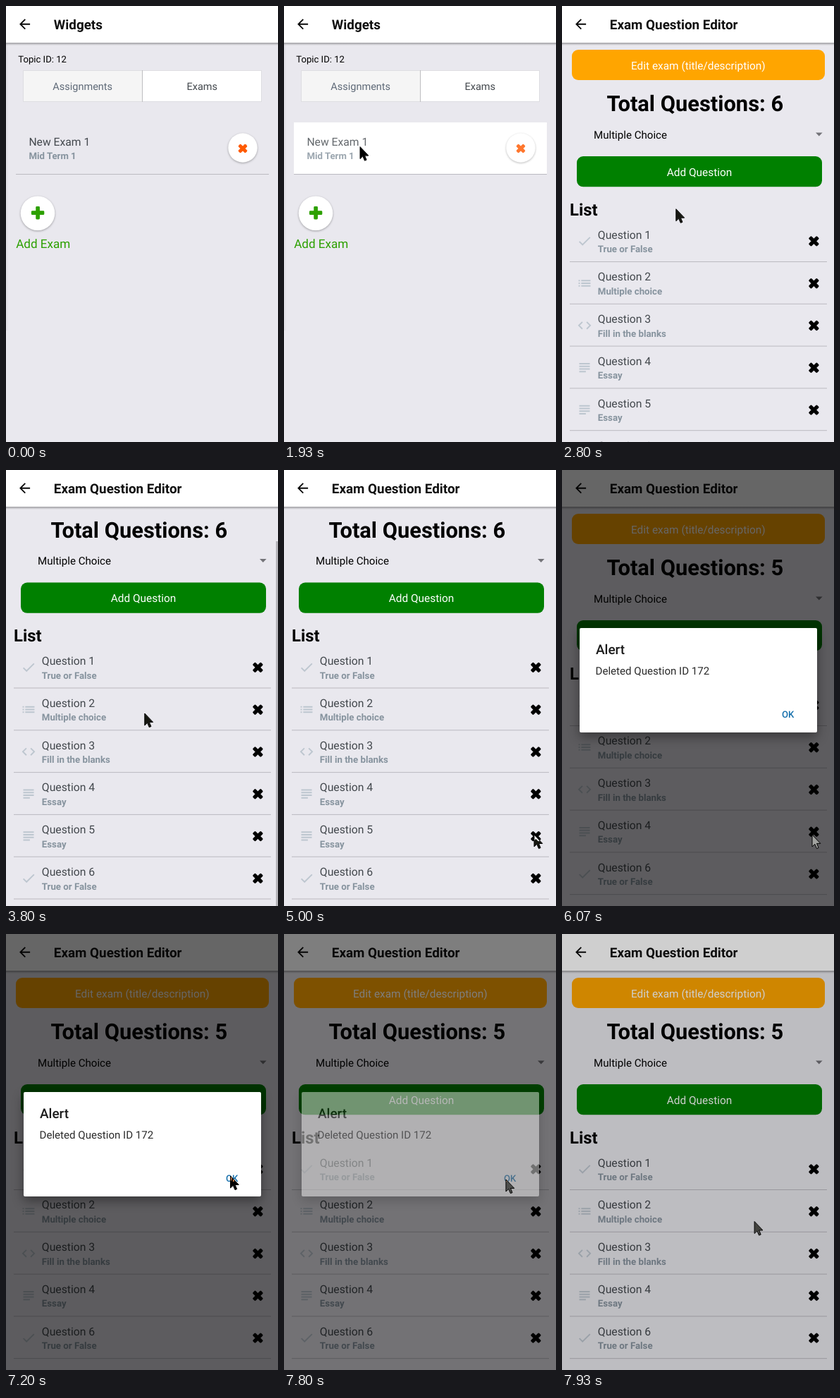
An HTML page for the animation above (8000 ms loop, 386 px wide and 618 px high).

```html
<!DOCTYPE html>
<html lang="en">
<head>
<meta charset="utf-8">
<title>Exam editor</title>
<style>
  html, body { margin: 0; width: 100%; height: 100%; overflow: hidden; background: #e9e8ee; }
  svg { display: block; isolation: isolate; }
  text { font-family: Roboto, "Noto Sans", sans-serif; text-rendering: geometricPrecision; white-space: pre; }
  .b { font-weight: 700; }
  .m { font-weight: 500; }
  .mid { text-anchor: middle; }
  .disc { fill: #fff; filter: drop-shadow(0 1px 1.5px rgba(0, 0, 0, .32)); }
  #alert { filter: drop-shadow(0 6px 8px rgba(0, 0, 0, .4)); }
  #arrowFill { mix-blend-mode: difference; }
</style>
</head>
<body>
<svg id="stage" width="386" height="618" viewBox="0 0 386 618"></svg>
<script>
const LOOP = 8000, FPS = 15;
const BG = '#e9e8ee', INK = '#43484d', SOFT = '#86939e', GREEN = '#2ca000', LINE = '#bbbac0';
const PITCH = 59.8, SCROLL = 53.5;

// ---------- drawing helpers ----------
const text = (x, y, size, fill, str, cls = '') =>
  `<text x="${x}" y="${y}" font-size="${size}" fill="${fill}" class="${cls}">${str}</text>`;
const rect = (x, y, w, h, fill, extra = '') =>
  `<rect x="${x}" y="${y}" width="${w}" height="${h}" fill="${fill}" ${extra}/>`;
const icon = (cx, cy, d, fill) =>
  `<path transform="translate(${cx} ${cy}) scale(.938) translate(-12 -12)" d="${d}" fill="${fill}"/>`;
const plus = (cx, cy, half, fat, turn, fill) =>
  `<g transform="translate(${cx} ${cy}) rotate(${turn})">` +
  rect(-half, -fat / 2, 2 * half, fat, fill, 'rx="1.4"') +
  rect(-fat / 2, -half, fat, 2 * half, fill, 'rx="1.4"') + '</g>';
const disc = (cx, cy, r) => `<circle class="disc" cx="${cx}" cy="${cy}" r="${r}"/>`;

const ICONS = {
  back: 'M20 11H7.83l5.59-5.59L12 4l-8 8 8 8 1.41-1.41L7.83 13H20z',
  check: 'M9 16.17L4.83 12l-1.42 1.41L9 19 21 7l-1.41-1.41z',
  list: 'M3 13h2v-2H3zM3 17h2v-2H3zM3 9h2V7H3zM7 13h14v-2H7zM7 17h14v-2H7zM7 7v2h14V7z',
  code: 'M9.4 16.6L4.8 12l4.6-4.6L8 6l-6 6 6 6zM14.6 16.6l4.6-4.6-4.6-4.6L16 6l6 6-6 6z',
  lines: 'M14 17H4v2h10zM20 9H4v2h16zM4 15h16v-2H4zM4 5v2h16V5z'
};

const header = title =>
  rect(0, 52, 386, 4, 'url(#drop)') + rect(0, 0, 386, 52, '#fff') +
  icon(26.6, 25.8, ICONS.back, '#0a0a0a') + text(67.8, 32.9, 18.85, '#111', title, 'b');

// ---------- screens ----------
const widgets =
  rect(0, 0, 386, 618, BG) +
  rect(0, 54, 4, 406, 'url(#edge)') +
  header('Widgets') +
  text(17.3, 80.1, 13.1, '#000', 'Topic ID: 12') +
  rect(24.5, 91.5, 338, 44, '#fff', 'stroke="#dedee2"') +
  rect(25, 92, 168, 43, '#f5f5f5') + rect(193, 91, 1, 45, '#bdbdc0') +
  text(108.7, 119, 14.5, '#5e6977', 'Assignments', 'mid') +
  text(278.3, 119, 14.5, INK, 'Exams', 'mid') +
  rect(14, 165, 359, 73, '#fff', 'id="rowPress"') +
  '<g id="examRow">' +
  text(32.4, 198, 15.7, INK, 'New Exam 1') +
  text(32.5, 217.2, 13.2, SOFT, 'Mid Term 1', 'b') +
  disc(336, 201, 20.7) + plus(336, 202, 7.2, 4.9, 45, '#ff5a00') + '</g>' +
  rect(14, 238, 359, 1, LINE) +
  disc(45, 293.7, 24.3) + plus(45.1, 293.2, 9.2, 5.7, 0, GREEN) +
  text(14.2, 342.9, 17.1, GREEN, 'Add Exam');

const questions = [
  ['check', 'True or False'], ['list', 'Multiple choice'], ['code', 'Fill in the blanks'],
  ['lines', 'Essay'], ['lines', 'Essay'], ['check', 'True or False']
];

const row = ([kind, label], i) =>
  `<g id="q${i + 1}" transform="translate(0 ${i * PITCH})">` +
  icon(32, 333.2, ICONS[kind], '#bdc6cf') +
  text(50.8, 329.6, 15.75, INK, 'Question ' + (i + 1)) +
  text(50.8, 349, 13.25, SOFT, label, 'b') +
  rect(349, 321, 17, 22, '#fff', `id="press${i + 1}" visibility="hidden"`) +
  plus(357.4, 333.4, 8.2, 5.4, 45, '#000') +
  rect(11, 362, 365, 1, LINE) + '</g>';

const editor =
  rect(0, 0, 386, 618, BG) +
  '<g id="content">' +
  rect(14, 62, 359, 43, '#ffa500', 'rx="9"') +
  text(193.3, 89.5, 15.4, '#fff', 'Edit exam (title/description)', 'mid') +
  '<text id="total" class="b mid" x="188.8" y="149.4" font-size="30.85"></text>' +
  text(45, 187.6, 15.1, '#000', 'Multiple Choice') +
  '<path d="M360 179.6h9.6l-4.8 4.9z" fill="#737378"/>' +
  rect(21, 213, 348, 43.3, '#008000', 'rx="9"') +
  text(195, 240.7, 15.4, '#fff', 'Add Question', 'mid') +
  text(11, 296.5, 23.8, '#000', 'List', 'b') +
  questions.map(row).join('') + '</g>' +
  rect(383, 52, 3, 517, '#000', 'id="bar"') +
  header('Exam Question Editor');

const alertBox =
  rect(25, 224, 337, 148, '#fff', 'rx="2"') +
  text(47.9, 261, 19, '#1c1c1c', 'Alert', 'm') +
  text(47.5, 290.2, 15.1, '#2b2b2b', 'Deleted Question ID 172') +
  text(311.9, 351, 13.2, '#1670ac', 'OK', 'm');

const ARROW = '0,0 0,17 3.8,13.3 6.5,19.6 9.1,18.5 6.5,12.4 11.8,12.4';

document.getElementById('stage').innerHTML =
  `<defs>
    <linearGradient id="drop" x2="0" y2="1"><stop stop-opacity=".32"/><stop offset="1" stop-opacity="0"/></linearGradient>
    <linearGradient id="edge"><stop stop-opacity=".05"/><stop offset="1" stop-opacity="0"/></linearGradient>
  </defs>
  ${widgets}
  <g id="editor">${editor}</g>
  ${rect(0, 0, 386, 618, '#000', 'id="scrim"')}
  <g id="alert">${alertBox}</g>
  <g id="cursor">
    <polygon id="arrowFill" points="${ARROW}" fill="#fff"/>
    <polygon points="${ARROW}" fill="none" stroke="#000" stroke-linejoin="round"/>
  </g>`;

// ---------- motion, timed in ticks of 1/15 s ----------
const ENTER = 2, ROW_PRESS = 29, OPEN = 30, ROLL = 42, REST = 56;
const CROSS_PRESS = 84, ALERT = 86, DELETED = 89, DISMISS = 116;

const ramp = (k, from, to) => Math.min(1, Math.max(0, (k - from) / (to - from)));
const smooth = u => u * u * (3 - 2 * u);
const settle = u => 1 - (1 - u) ** 2;

// The cursor glides from one stop to the next.
const HOME = { x: 388, y: 632 };
const STOPS = [
  { from: 0, to: 16, x: 108, y: 199.6 },
  { from: 38, to: 45, x: 196.8, y: 345 },
  { from: 60, to: 75, x: 355, y: 517 },
  { from: 97, to: 108, x: 318.5, y: 343 },
  { from: 116.4, to: 121, x: 242.5, y: 451 }
];
const cursorAt = k => STOPS.reduce((p, s) => {
  const u = smooth(ramp(k, s.from, s.to));
  return { x: p.x + (s.x - p.x) * u, y: p.y + (s.y - p.y) * u };
}, HOME);

const el = {};
document.querySelectorAll('[id]').forEach(e => el[e.id] = e);
const set = (id, name, value) => el[id].setAttribute(name, value);
const show = (id, on) => set(id, 'visibility', on ? 'visible' : 'hidden');
const fade = (id, v) => { set(id, 'opacity', v); el[id].style.display = v > 0 ? '' : 'none'; };
const move = (id, x, y) => set(id, 'transform', `translate(${x} ${y})`);

function draw(now) {
  // the picture holds for each tick; the offset absorbs rounding to 10 ms
  const k = Math.floor((now % LOOP + 4) * FPS / 1000) % (LOOP * FPS / 1000);
  const deleted = k >= DELETED;

  show('rowPress', k >= ROW_PRESS);
  set('examRow', 'opacity', k >= ROW_PRESS ? .82 : 1);

  const open = settle(ramp(k, OPEN, OPEN + 4));
  const roll = deleted ? 0 : smooth(ramp(k, ROLL, ROLL + 7));
  fade('editor', open);
  move('content', 0, (1 - open) * 20 - roll * SCROLL);
  set('bar', 'y', 52 + roll * 49);
  fade('bar', .28 * (ramp(k, ROLL, ROLL + 1) - ramp(k, REST, REST + 5)));

  el.total.textContent = 'Total Questions: ' + (deleted ? 5 : 6);
  el.q5.style.display = deleted ? 'none' : '';
  move('q6', 0, PITCH * (deleted ? 4 : 5));
  show('press5', k >= CROSS_PRESS);

  fade('scrim', .6 * (ramp(k, ALERT, ALERT + 4.3) - ramp(k, DISMISS + .4, DISMISS + 4.2)));
  fade('alert', ramp(k, ALERT, ALERT + 1.4) - ramp(k, DISMISS, DISMISS + 1.8));

  const { x, y } = cursorAt(k);
  show('cursor', k >= ENTER);
  // offsets go on the shapes so that the fill still blends with the screen below
  for (const shape of el.cursor.children) shape.setAttribute('transform', `translate(${x} ${y})`);
}

function loop() {
  draw(performance.now());
  requestAnimationFrame(loop);
}
loop();
</script>
</body>
</html>
```
